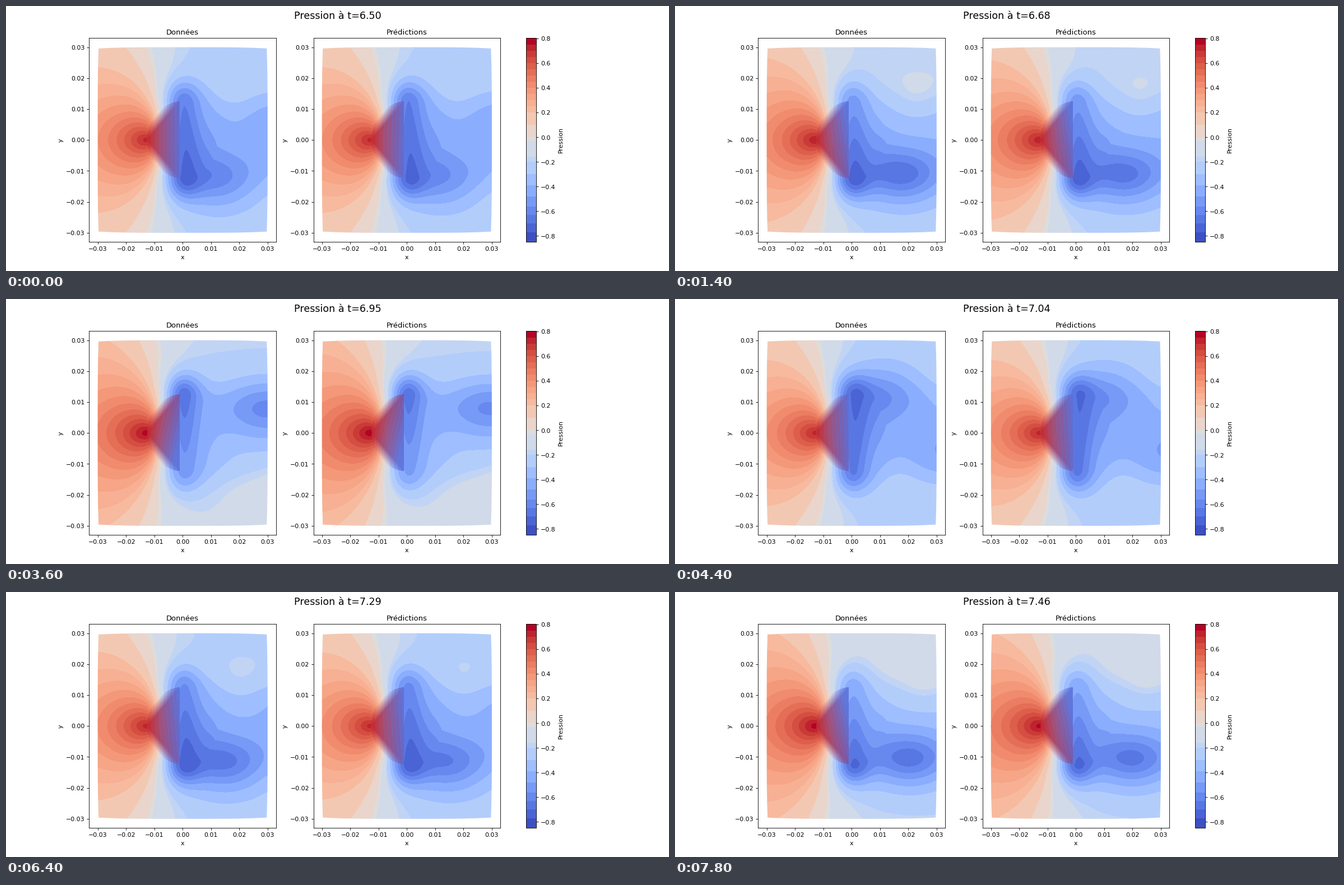
A matplotlib script that plays this animation: 1183x473 px, repeating every 8 s.

```python
import numpy as np
import matplotlib.pyplot as plt
from matplotlib.animation import FuncAnimation
from matplotlib.cm import ScalarMappable
from matplotlib.colors import BoundaryNorm, ListedColormap
from matplotlib.path import Path

FRAMES = 40
UNIT = 0.01               # the field is computed in hundredths of x and y
R = 1.25                  # cylinder radius
CYCLE = 19 / 3            # frames per shedding cycle

LEVELS = np.r_[-0.85, -0.77, -0.7, -0.63, -0.56, -0.48, -0.39, -0.3, -0.2,
               -0.16, -0.03, 0, 0.1, np.arange(4, 16) * 0.05, 0.805]
MIDS = (LEVELS[1:] + LEVELS[:-1]) / 2
COLORS = plt.get_cmap("coolwarm")(0.5 + (MIDS + 0.025) / 1.6)


def gauss(dx, dy, sx, sy):
    return np.exp(-(dx / sx) ** 2 / 2 - (dy / sy) ** 2 / 2)


def flow(x, y, phase, gain):
    """Pressure outside the cylinder at a phase of the shedding cycle."""
    swing = np.sin(2 * np.pi * phase)
    lift = 0.1 * abs(swing) ** 3

    # stagnation zone, cut off at an angle that grows with the radius
    r = np.maximum(np.hypot(x, y), R)
    angle = np.degrees(np.arccos(np.clip(-x / r, -1, 1)))
    limit = np.degrees(np.arccos((0.9 + 0.15 * (r - R)) / r))
    front = 1 / (1 + np.exp((angle - limit) / 11))
    head = 0.74 / (1 + (np.hypot(x + R, 1.55 * y) / 2) ** 1.2)

    # wake
    rear = -0.23 - 0.08 * gauss(x - 0.7, y, 0.6, 1.1)
    rear -= (0.14 * np.exp(-(y / 1.5) ** 4)
             * (0.5 + 0.5 * np.tanh((x - 0.2) / 0.5)))
    for side in (1, -1):
        age = (phase + 0.5 + 0.25 * side) % 1
        amp = 0.33 * gain * np.sin(np.pi * age ** 0.75) ** 2
        vx = 0.1 + 4.8 * age
        vy = side * (1.4 - 1.8 * np.clip(age - 0.25, 0, 0.5))
        rear -= amp * gauss(x - vx, y - vy, 1.0, 0.68)
        rear += 0.16 * amp * gauss(x - vx - 0.5, y + 1.4 * side, 0.5, 0.45)
        rear -= ((0.36 - 0.1 * side * swing)
                 * gauss(x + 0.05, y - 1.3 * side, 0.48, 0.48))
        rear += (0.08 * side * swing * (0.5 + 0.5 * np.tanh(x))
                 * np.exp(-((y - 1.5 * side) / 1.3) ** 2))
    return front * head + (1 - front) * rear + lift


xs = np.linspace(-3, 3, 243)
ys = np.linspace(-3, 3, 265)
X, Y = np.meshgrid(xs, ys)
INSIDE = np.hypot(X, Y) < R
HALF = np.sqrt(np.maximum(R * R - xs ** 2, 0))


def pressure(phase, gain):
    """Flow field, with the cylinder filled by interpolation along chords."""
    p = flow(X, Y, phase, gain)
    top = flow(xs, HALF, phase, gain)
    bottom = flow(xs, -HALF, phase, gain)
    w = (Y / np.maximum(HALF, 1e-6) + 1) / 2
    p = np.where(INSIDE, bottom + (top - bottom) * w, p)
    return np.clip(p, LEVELS[0] + 1e-3, LEVELS[-1] - 1e-3)


BX, BY = np.meshgrid(np.linspace(-R, 0, 64), np.linspace(-R, R, 138))
RED = np.array([190, 38, 52]) / 255
BLUE = np.array([92, 114, 218]) / 255


def facets(phase):
    """Red to blue stripes in a triangle that fades out towards the arc."""
    s = BX + 0.3 * np.sin(2 * np.pi * phase) * BY
    mix = np.clip((np.floor(s / 0.14) * 0.14 + 1.25) / 1.15, 0, 1)[..., None]
    rgb = RED + (BLUE - RED) * mix
    depth = BX + R - 0.926 * np.abs(BY)
    shown = (np.hypot(BX, BY) < R) & (BX < -0.1)
    alpha = 0.9 * np.clip(1 + depth / 0.42, 0, 1) * shown
    return np.dstack([rgb, alpha])


def outline():
    """Slightly bowed square bounding the data."""
    t = np.linspace(-1, 1, 13)
    along = 2.97 * t
    side_x = 3 - 0.03 * t ** 4
    side_y = 3 - 0.04 * t ** 4
    px = np.r_[along, side_x, -along, -side_x]
    py = np.r_[side_y, -along, -side_y, along]
    return Path(np.column_stack([px, py]) * UNIT)


fig, axes = plt.subplots(1, 2, figsize=(15, 6), dpi=78.875,
                         gridspec_kw=dict(left=0.1255, right=0.9005,
                                          bottom=0.109, top=0.879))
title = fig.suptitle("", fontsize=16)
for ax, name in zip(axes, ("Données", "Prédictions")):
    ax.set(title=name, xlabel="x", ylabel="y",
           xlim=(-0.033, 0.033), ylim=(-0.033, 0.033))
    ax.autoscale(False)

scale = ScalarMappable(BoundaryNorm(LEVELS, len(COLORS)),
                       ListedColormap(COLORS))
bar = fig.colorbar(scale, ax=list(axes), label="Pression",
                   spacing="proportional", ticks=np.arange(-8, 9, 2) / 10)
bar.minorticks_off()

FRAME = outline()
BODY = [-R * UNIT, 0, -R * UNIT, R * UNIT]
SETTINGS = ((0, 1), (-0.01, 0.95))     # phase shift and vortex gain per panel
layers = []


def draw(k):
    for layer in layers:
        layer.remove()
    layers.clear()
    title.set_text(f"Pression à t={6.503 + 0.02459 * k:.2f}")
    for ax, (shift, gain) in zip(axes, SETTINGS):
        phase = k / CYCLE + shift
        field = ax.contourf(xs * UNIT, ys * UNIT, pressure(phase, gain),
                            levels=LEVELS, colors=COLORS)
        field.set_clip_path(FRAME, ax.transData)
        body = ax.imshow(facets(phase), extent=BODY, origin="lower",
                         aspect="auto", interpolation="nearest", zorder=1.5)
        layers.extend([field, body])
    return layers


anim = FuncAnimation(fig, draw, frames=FRAMES, interval=200, repeat=True)
plt.show()
```
